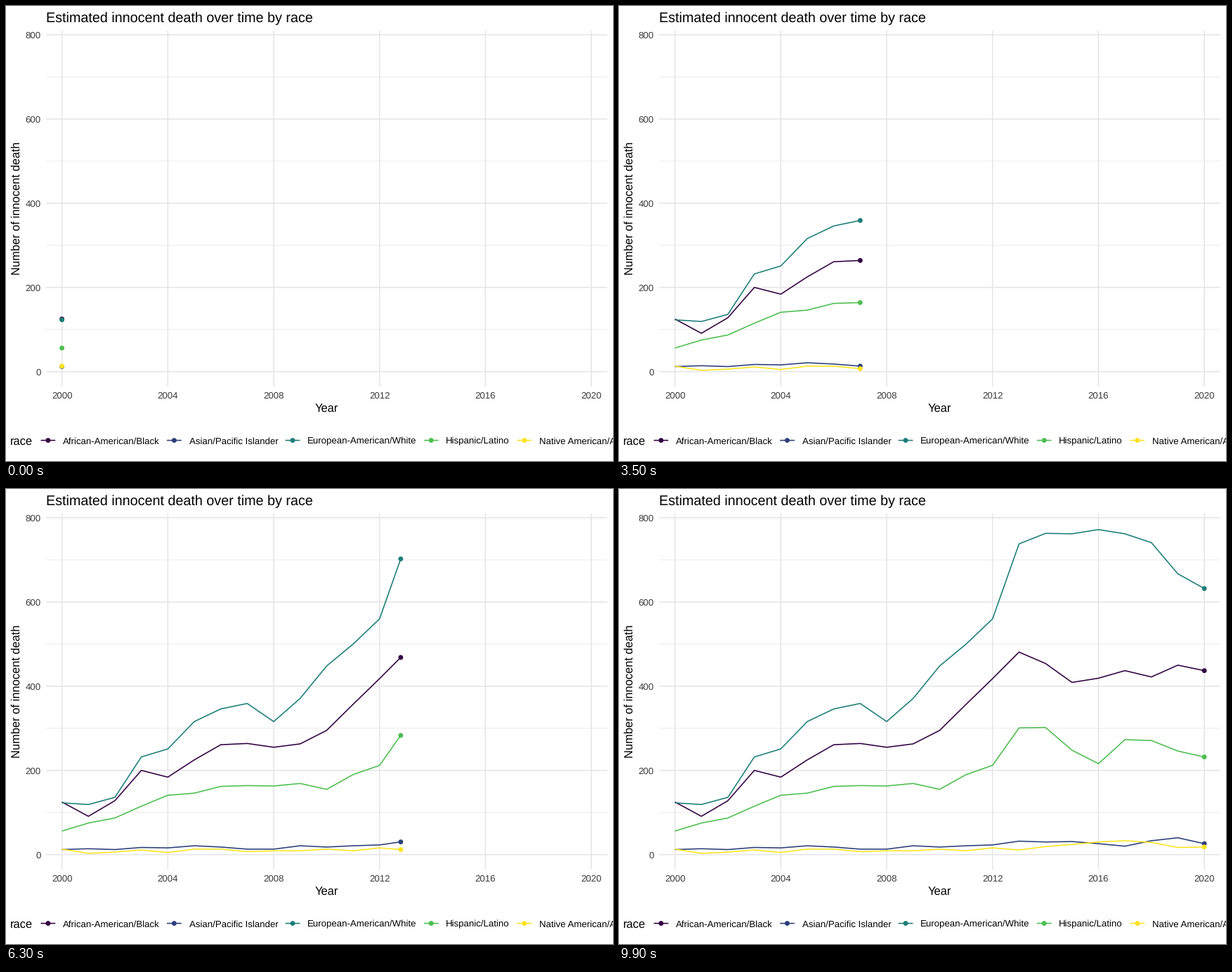
These frames come from a looping animation (864 px wide and 648 px high, 10 s). A matplotlib script:

```python
import numpy as np
import matplotlib.pyplot as plt
from matplotlib.animation import FuncAnimation
from matplotlib.patches import Circle

W, H, DPI = 864, 648, 72  # at 72 dpi one point is one pixel
FRAMES, INTERVAL = 100, 100

plt.rcParams.update({
    "font.family": "Liberation Sans",
    "text.hinting": "none",
    "toolbar": "None",
})

YEARS = np.arange(2000, 2021)
# label, colour, legend key centre, yearly values
SERIES = [
    ("African-American/Black", "#330042", 59.9,
     [125, 91, 128, 200, 184, 225, 261, 264, 255, 263, 295,
      357, 418, 481, 454, 409, 419, 437, 422, 450, 437]),
    ("Asian/Pacific Islander", "#2C3F78", 239.4,
     [12, 14, 12, 17, 16, 21, 18, 13, 13, 21, 18,
      21, 23, 32, 30, 31, 26, 20, 33, 40, 26]),
    ("European-American/White", "#1C7E79", 408.0,
     [123, 119, 136, 232, 251, 316, 346, 359, 316, 371, 448,
      500, 560, 738, 763, 762, 772, 762, 741, 667, 632]),
    ("Hispanic/Latino", "#4CBF4E", 605.2,
     [56, 75, 87, 115, 141, 146, 162, 164, 163, 169, 155,
      190, 212, 301, 302, 248, 216, 273, 271, 246, 232]),
    ("Native American/Alaskan", "#FDE31E", 737.9,
     [13, 3, 6, 11, 5, 13, 13, 7, 9, 9, 13,
      9, 16, 11, 19, 24, 30, 33, 29, 17, 18]),
]

LEFT, RIGHT, TOP, BOTTOM = 57.0, 855.75, 34.8, 541.9
TITLE, LABEL, TICK = 19.8, 16.5, 13.2
LINE_W, DOT_R = 1.6, 3.45
GRID, TICK_COLOR = "#E6E6E6", "#3B3B3B"


def px(year):
    return 79.6 + (year - 2000) * 37.677


def py(value):
    return 520.7 - value * 0.5996


fig = plt.figure(figsize=(W / DPI, H / DPI), dpi=DPI, facecolor="white")
ax = fig.add_axes([0, 0, 1, 1])
ax.set_xlim(0, W)
ax.set_ylim(H, 0)
ax.axis("off")


def stroke(xs, ys, color, width=LINE_W, z=2):
    line, = ax.plot(xs, ys, color=color, lw=width, zorder=z, snap=False,
                    solid_capstyle="butt", solid_joinstyle="round")
    return line


def dot(x, y, color):
    return ax.add_patch(Circle((x, y), DOT_R, fc=color, lw=0, zorder=3))


def label(x, y, text, size, color="black", ha="left", **kw):
    ax.text(x, y, text, fontsize=size, color=color, ha=ha,
            **{"va": "baseline", **kw})


# grid and tick labels
for v in range(100, 800, 200):
    stroke([LEFT, RIGHT], [py(v)] * 2, GRID, LINE_W / 2, 0)
for v in range(0, 801, 200):
    stroke([LEFT, RIGHT], [py(v)] * 2, GRID, z=1)
    label(49.5, py(v) + 4.8, str(v), TICK, TICK_COLOR, "right")
for year in range(2000, 2021, 4):
    stroke([px(year)] * 2, [TOP, BOTTOM], GRID, z=1)
    label(px(year), 559, str(year), TICK, TICK_COLOR, "center")

# titles
label(LEFT, 22.6, "Estimated innocent death over time by race", TITLE)
label((LEFT + RIGHT) / 2, 578, "Year", LABEL, ha="center")
label(20.2, (TOP + BOTTOM) / 2, "Number of innocent death", LABEL,
      ha="right", va="center", rotation=90, rotation_mode="default") if False else \
    label(20.2, (TOP + BOTTOM) / 2, "Number of innocent death", LABEL,
          ha="center", rotation=90, rotation_mode="anchor")

# legend
label(6, 625, "race", LABEL)
for name, color, x, _ in SERIES:
    stroke([x - 10.4, x + 10.4], [618.6] * 2, color)
    dot(x, 618.6, color)
    label(x + 21.2, 623.7, name, TICK)

lines = [stroke([], [], color) for _, color, _, _ in SERIES]
heads = [dot(0, 0, color) for _, color, _, _ in SERIES]

# five steps per year, except four steps from 2010 to 2011
KEYS = [0, 50, 54, 99]
KEY_YEARS = [2000, 2010, 2011, 2020]


def draw(frame):
    now = np.interp(frame, KEYS, KEY_YEARS)
    past = YEARS < now - 1e-9
    for (_, _, _, values), line, head in zip(SERIES, lines, heads):
        value = np.interp(now, YEARS, values)
        xs = px(np.append(YEARS[past], now))
        ys = py(np.append(np.array(values)[past], value))
        line.set_data(xs, ys)
        head.set_center((xs[-1], ys[-1]))
    return lines + heads


anim = FuncAnimation(fig, draw, frames=FRAMES, interval=INTERVAL,
                     repeat=True, repeat_delay=0, blit=False)
plt.show()
```
